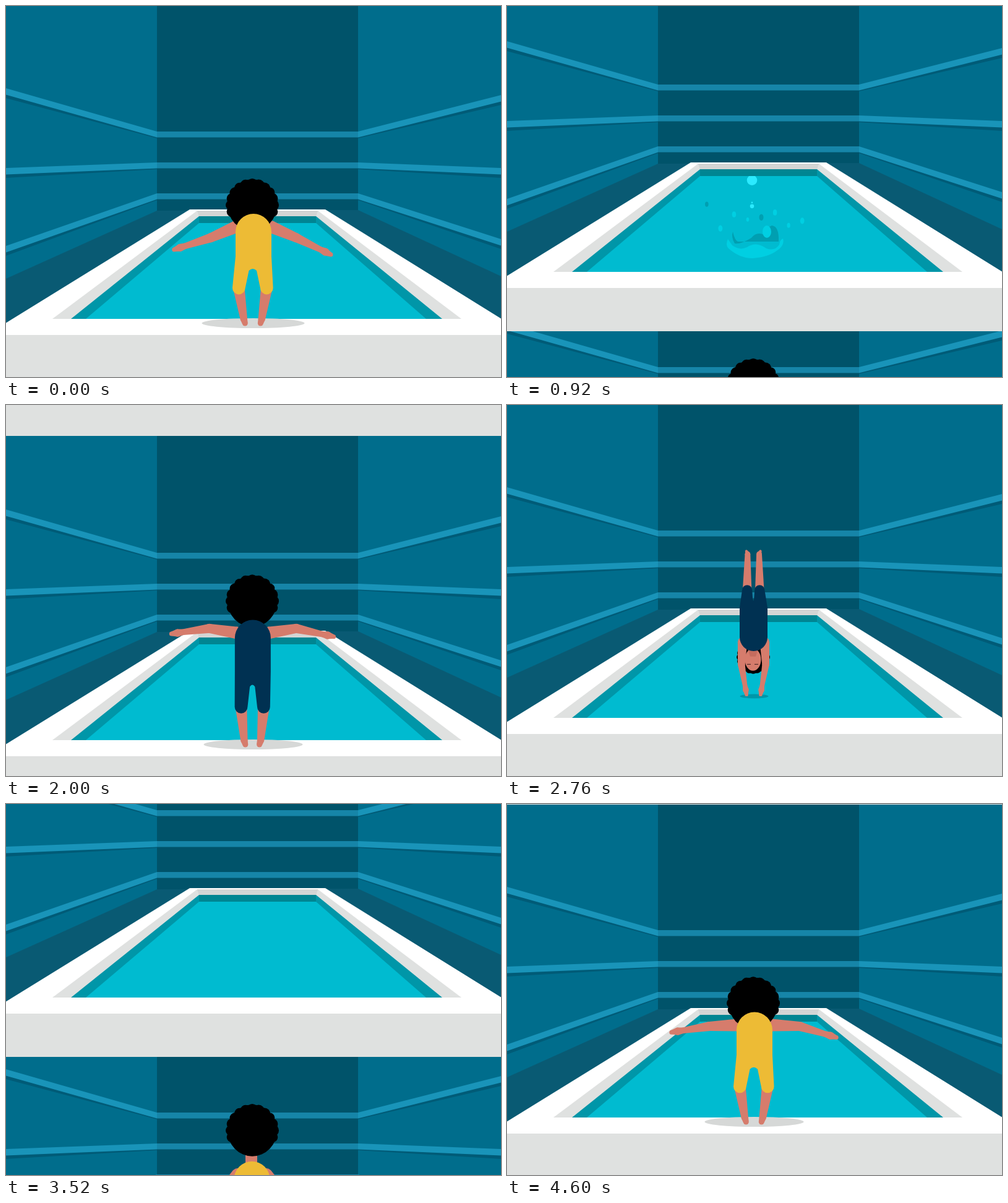
An HTML page with a canvas for the animation above (4640 ms loop, 800 by 600 pixels).

```html
<!DOCTYPE html>
<html lang="en">
<head>
<meta charset="utf-8">
<title>Endless dive</title>
<style>
  html, body { margin: 0; width: 100%; height: 100%; overflow: hidden; }
  canvas { display: block; }
</style>
</head>
<body>
<canvas id="stage" width="800" height="600"></canvas>
<script>
const ctx = document.getElementById('stage').getContext('2d');
const TURN = 2320, ROOM = 602, NEXT = 436, WATERLINE = 471;
const SKIN = '#d67c6c', SUITS = ['#edbb35', '#003152'];
const LIGHT = '#00cfe2', DARK = '#009fb1', BRIGHT = '#2beaff';

const clamp = (v, lo, hi) => Math.min(hi, Math.max(lo, v));
const ramp = (t, from, to) => clamp((t - from) / (to - from), 0, 1);
const ease = (t, from, to) => { const u = ramp(t, from, to); return u * u * (3 - 2 * u); };
const random = seed => { const v = Math.sin(seed * 12.9898) * 43758.5453; return v - Math.floor(v); };

function poly(colour, ...p) {
  ctx.fillStyle = colour;
  ctx.beginPath();
  for (let i = 0; i < p.length; i += 2) ctx.lineTo(p[i], p[i + 1]);
  ctx.fill();
}

function oval(colour, x, y, rx, ry = rx) {
  ctx.fillStyle = colour;
  ctx.beginPath();
  ctx.ellipse(x, y, Math.max(0, rx), Math.max(0, ry), 0, 0, 7);
  ctx.fill();
}

function shape(colour, path) {
  ctx.fillStyle = colour;
  ctx.fill(new Path2D(path));
}

// Tapered chain of [x, y, radius] joints
function limb(...joints) {
  joints.forEach(([x, y, r], i) => {
    oval(SKIN, x, y, r);
    if (!i) return;
    const [px, py, pr] = joints[i - 1];
    const len = Math.hypot(x - px, y - py) || 1;
    const nx = (py - y) / len, ny = (x - px) / len;
    poly(SKIN, px + nx * pr, py + ny * pr, x + nx * r, y + ny * r,
      x - nx * r, y - ny * r, px - nx * pr, py - ny * pr);
  });
}

function drawRoom() {
  poly('#095a73', 0, 0, 800, 0, 800, 540, 0, 540);
  poly('#006d8c', 0, 0, 244, 0, 244, 331, 0, 441);
  poly('#006d8c', 569, 0, 800, 0, 800, 437, 569, 330);
  poly('#00536a', 244, 0, 569, 0, 569, 330, 244, 331);
  for (const [left, back, right] of [[133, 203, 144], [262, 253, 262], [388, 303, 377]]) {
    for (const [edge, corner, y] of [[0, 244, left], [800, 569, right]]) {
      poly('#005b77', edge, y + 10, corner, back + 9, corner, back + 11, edge, y + 16);
      poly('#1994b9', edge, y, corner, back, corner, back + 9.5, edge, y + 10.5);
    }
    poly('#1685a8', 244, back, 569, back, 569, back + 9.5, 244, back + 9.5);
  }
  poly('#fff', 297, 329, 516, 329, 800, 505.5, 800, 532, 0, 532, 0, 512.5);
  poly('#dfe1e0', 309, 331, 504, 331, 736, 506, 75, 506);
  poly('#d3d5d4', 309, 331, 504, 331, 501, 340.5, 312, 340.5);
  poly('#0096a8', 312, 340, 501, 340, 705, 506, 105, 506);
  poly('#008592', 312, 340, 501, 340, 501, 351, 312, 351);
  poly('#00bbd0', 312, 351, 501, 351, 679, 506, 129, 506);
  poly('#dfe1e0', 0, 532, 800, 532, 800, ROOM, 0, ROOM);
}

// Curls sit on the crown side; dir is -1 when upside down
function drawHair(x, y, r, dir) {
  oval('#000', x, y, r * .93, r * .97);
  for (let i = 0; i < 13; i++) {
    const a = Math.PI * (1.1 - i / 12 * 1.2), curl = r * (.17 + .06 * random(i + 3));
    oval('#000', x + Math.cos(a) * (r - curl), y - dir * Math.sin(a) * (r - curl), curl);
  }
}

function drawSwimmer(t, suit) {
  const shadow = 1 - ramp(t, 90, 220), below = ramp(t, 300, 440) - ramp(t, 500, 580);
  oval('#d6d8d7', 399.5, 513, (80 + 3 * ramp(t, -40, 0)) * shadow, 8 * shadow);
  oval('#0096a8', 399.5, WATERLINE, 23 * below, 3.5 * below);
  if (t > 550) return;

  // The figure is described standing; crouch bends it, flight turns it over
  const crouch = ease(t, -680, 0) - ease(t, 0, 110), flight = ramp(t, 110, 440);
  const stretch = .15 + .85 * Math.cos(Math.PI * flight);
  const centre = 400 - 87 * flight - 320 * flight * (1 - flight) + 2.4 * Math.max(0, t - 440);
  const place = y => centre + stretch * (y - 400);
  const dir = stretch < 0 ? -1 : 1, sweep = dir > 0 ? 1 : 0;
  const size = 1 - .224 * flight, w = 29 * size, cx = 397.5 + 2.5 * crouch + flight;
  const mid = 397.5 + 1.3 * crouch + .7 * flight;

  const neckY = 282 + 54 * crouch, top = place(neckY), hip = place(382 + 23 * crouch);
  const head = place(232 + 90 * crouch + 36 * flight);
  const crotch = place(406 + 19 * crouch - 8 * flight), knee = place(448 + 8 * crouch - 25 * flight);
  const kneeX = (13 + 9.5 * crouch) * size, kneeR = 10.4 * size, ankleX = (12 + 2.5 * crouch) * size;

  // Arm angles in degrees, measured from hanging straight down
  const upper = 42 + 61 * ease(t, -700, -250) - 83 * ease(t, -100, 120) + 157 * ease(t, 110, 250);
  const fore = 10 + 72 * ease(t, -800, -380) - 62 * ease(t, -55, 165) + 170 * ease(t, 120, 260);

  function drawArm(side) {
    const reach = 1 + .15 * flight;
    const a = upper * Math.PI / 180, b = (fore - (side > 0 ? 8 * crouch : 0)) * Math.PI / 180;
    const joint = (up, low, r) => [
      cx + side * size * (23 + 5 * crouch + up * Math.sin(a) + low * Math.sin(b)),
      place(neckY + 21 + reach * (up * Math.cos(a) + low * Math.cos(b))), r * size];
    limb(joint(0, 0, 10), joint(45, 0, 7.5), joint(45, 43, 4.8), joint(45, 52, 6.2), joint(45, 62, 3.5));
  }

  ctx.save();
  if (t > 300) {
    ctx.beginPath();
    ctx.rect(0, -200, 800, 200 + WATERLINE);
    ctx.clip();
  }
  for (const side of [-1, 1]) {
    limb([mid + side * kneeX, knee, kneeR * .9], [mid + side * ankleX, place(506), 5.7 * size],
      [mid + side * (ankleX - 2 * dir), place(513), 4.5 - 2.5 * flight]);
    if (dir > 0) drawArm(side);
  }
  if (dir > 0) poly(SKIN, cx - 10.5, head, cx + 8.5, head, cx + 8.5, top + 6, cx - 10.5, top + 6);
  drawHair(398, head, 43 - 16 * flight, dir);
  if (dir < 0) {
    oval(SKIN, 397.5, head + 4, 13, 18);
    poly('#c56c5e', 389, head - 14, 406, head - 14, 402, head - 1, 393, head - 1);
    for (const x of [388, 400]) poly('#532b2a', x, head + 11, x + 6, head + 11, x + 6, head + 12.2, x, head + 12.2);
    drawArm(-1);
    drawArm(1);
  }

  const dome = clamp(hip - top, -w, w), gap = Math.max(1, kneeX * .5 - 5), fork = crotch + 3 * dir;
  const leg = x => `L${x + kneeR} ${knee}A${kneeR} ${kneeR} 0 0 ${sweep} ${x - kneeR} ${knee}`;
  shape(suit, `M${cx - w} ${top + dome}
    A${w} ${Math.abs(dome) + .01} 0 0 ${sweep} ${cx + w} ${top + dome}
    L${cx + w} ${hip}${leg(mid + kneeX)}
    L${mid + gap} ${fork}Q${mid} ${crotch - 3 * dir} ${mid - gap} ${fork}
    ${leg(mid - kneeX)}L${cx - w} ${hip}Z`);
  ctx.restore();
}

function drawCrown(t) {
  const size = .4 + .6 * ramp(t, 470, 800);
  ctx.save();
  ctx.globalAlpha = 1 - ramp(t, 930, 1080);
  ctx.translate(401, 470);
  ctx.scale(size, size * (1.5 - .5 * ramp(t, 600, 920)));
  shape(DARK, 'M-36 -29Q-33 -15 -28 -13L38 -13Q39 -38 27 -39Q18 -36 15 -24Q2 -30 -6 -19Q-24 -8 -33 -10Q-39 -20 -36 -29Z');
  shape(LIGHT, 'M-44 -17Q-48 -8 -44 -3Q-26 14 -4 14Q22 12 36 1Q48 -7 45 -18Q40 -16 39 -8Q32 3 18 -2Q2 -14 -13 -4Q-25 2 -37 -7Z');
  oval(LIGHT, 19, -29, 7, 10);
  ctx.restore();
}

function drawSplash(t) {
  if (t < 470 || t > 1780) return;
  ctx.save();
  ctx.beginPath();
  for (const [x, y] of [[312, 351], [501, 351], [679, 506], [129, 506]]) ctx.lineTo(x, y);
  ctx.clip();
  if (t < 1080) {
    drawCrown(t);
    const q = (t - 470) / 450, size = ramp(t, 470, 560) * (1 - ramp(t, 960, 1120));
    for (let i = 0; i < 8; i++) {
      const x = (i - 3.5) * 22, y = -30 - 45 * random(i + 1) - 110 * (1 - q), r = size * (2 + 1.5 * random(i + 9));
      oval(i % 4 ? LIGHT : DARK, 400 + x * q, 468 + y * q, r, r * 1.5);
    }
    for (const [height, r] of [[110, 8.3], [74, 1.3], [68, 3.3]]) {
      oval(BRIGHT, 400 - 4 * q, 468 - height * q, r * size);
    }
  }
  // Late drops drift down and stretch until they vanish
  const grow = ramp(t, 1300, 1480) * (1 - ramp(t, 1670, 1780)), s = ramp(t, 1520, 1640);
  oval(BRIGHT, 401 + 2 * s, 413 + (t - 1520) * .108, (6 - 2.3 * s) * grow, (4.7 + 2.3 * s) * grow);
  oval(BRIGHT, 392 - s, 424 + 2 * s, 2.7 * grow);
  oval(BRIGHT, 394.5, 430.5, 1.8 * grow * (1 - s));
  oval(BRIGHT, 399, 460, 1.7 * grow * (1 - s), 2.5 * grow * (1 - s));
  ctx.restore();
}

function drawScene(offset, t, suit) {
  ctx.save();
  ctx.translate(0, Math.round(offset));
  drawRoom();
  drawSplash(t);
  drawSwimmer(t, suit);
  ctx.restore();
}

function frame() {
  const now = performance.now() % (2 * TURN);
  const turn = now < TURN ? 0 : 1, t = now % TURN, scroll = ease(t, 520, TURN);
  // The coming room rises more slowly from behind the current one
  if (scroll > 0) drawScene(NEXT * (1 - scroll), t - TURN, SUITS[1 - turn]);
  drawScene(-ROOM * scroll, t, SUITS[turn]);
  requestAnimationFrame(frame);
}
frame();
</script>
</body>
</html>
```
